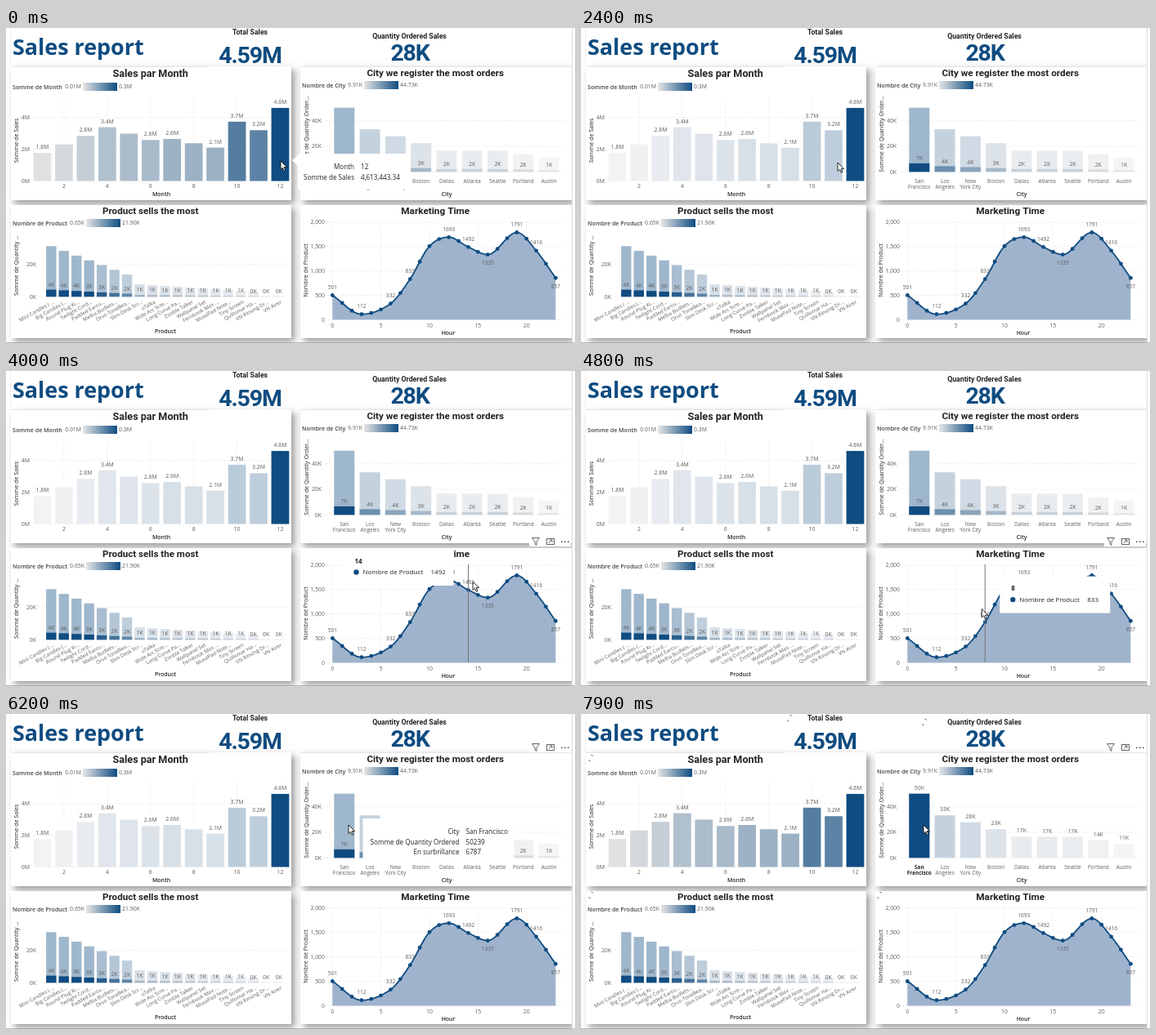
An HTML page with a canvas that plays this animation: 696 by 386 pixels, repeating every 8000 ms.

```html
<!DOCTYPE html>
<html lang="en">
<head>
<meta charset="utf-8">
<title>Sales report</title>
<style>
html, body { margin: 0; width: 100%; height: 100%; overflow: hidden; background: #fff; }
canvas { display: block; }
</style>
</head>
<body>
<canvas width="696" height="386"></canvas>
<script>
const ctx = document.querySelector('canvas').getContext('2d');
const LOOP = 8000;
const BLUE = '#0f4c81', INK = '#252423', GRAY = '#605e5c';
const PALE = [230, 230, 230], DEEP = [15, 76, 129];
const SANS = '"Open Sans", sans-serif', HEAD = 'Roboto, sans-serif';

const cities = ['San Francisco', 'Los Angeles', 'New York City', 'Boston', 'Dallas',
  'Atlanta', 'Seattle', 'Portland', 'Austin'];
const products = ['Mini Candles ( ...', 'Big Candles (...', 'Round Plug Ki...', 'Twilight Cord...',
  'Padded Earcu...', 'Melba Budlets...', 'Orvo ToneBea...', 'Slim Desk Scr...', 'uTalka',
  'Wide Arc Scre...', 'Long Curve Pa...', 'Zimble Talker', 'Wallpanel Set', 'Fernbook Max ...',
  'MusePad Note...', 'Tiny Screen', 'Quillomar Ha...', 'VN Rinsing Dr...', 'VN Airer'];

// Turning points only: straight lines join the bars and the pointer's stops, a smooth curve the hours.
const monthKeys = [[1, 1.76], [4, 3.39], [6, 2.58], [7, 2.65], [9, 2.1], [10, 3.74], [11, 3.2], [12, 4.61]];
const cityKeys = [[0, 50.24], [1, 33.29], [3, 22.5], [4, 16.7], [6, 16.5], [8, 11.15]];
const productKeys = [[0, 31], [6, 13.6], [7, 7.6], [16, 3.1], [17, .66], [18, .65]];
const hourKeys = [[0, 501], [3, 112], [6, 332], [8, 833], [10, 1510], [12, 1693], [14, 1492],
  [16, 1335], [19, 1791], [21, 1416], [23, 857]];
const pointerKeys = [[0, 336, 163], [600, 322, 164], [1000, 322, 164], [1700, 314, 165], [2600, 314, 165],
  [3200, 420, 285], [4000, 571, 258], [5000, 470, 300], [5400, 443, 143], [5900, 419, 136], [LOOP, 419, 136]];

const hourX = h => 399.3 + h * 11.87;
const hourY = v => 357.4 - v * .0597;

function segment(keys, x) {
  const i = Math.max(1, keys.findIndex(k => k[0] >= x));
  return [i, (x - keys[i - 1][0]) / (keys[i][0] - keys[i - 1][0])];
}

function along(keys, x, col = 1) {
  const [i, k] = segment(keys, x);
  return keys[i - 1][col] * (1 - k) + keys[i][col] * k;
}

// slope at a key, flat at peaks and valleys
function slope(keys, i) {
  const a = keys[i - 1] || keys[i], b = keys[i], c = keys[i + 1] || b;
  if ((b[1] - a[1]) * (c[1] - b[1]) < 0) return 0;
  return (c[1] - a[1]) / (c[0] - a[0]);
}

function smooth(keys, x) {
  const [i, k] = segment(keys, x), w = keys[i][0] - keys[i - 1][0], ease = k * k * (3 - 2 * k);
  return keys[i - 1][1] * (1 - ease) + keys[i][1] * ease +
    w * k * (1 - k) * (slope(keys, i - 1) * (1 - k) - slope(keys, i) * k);
}

function tone(p) {
  const q = Math.max(0, Math.min(1, p));
  return `rgb(${PALE.map((a, i) => Math.round(a + (DEEP[i] - a) * q))})`;
}

// y is the middle of the capitals
function text(s, x, y, { size = 6.9, color = GRAY, align = 'center', weight = 400, font = SANS, gap = 0 } = {}) {
  ctx.font = `${weight} ${size}px ${font}`;
  ctx.letterSpacing = gap + 'px';
  ctx.textAlign = align;
  ctx.fillStyle = color;
  ctx.fillText(s, x, y + size * .36);
}

function turned(s, x, y, angle, style) {
  ctx.save();
  ctx.translate(x, y);
  ctx.rotate(angle);
  text(s, 0, 0, style);
  ctx.restore();
}

function rect(x, y, w, h, color, alpha = 1) {
  ctx.globalAlpha = alpha;
  ctx.fillStyle = color;
  ctx.fillRect(x, y, w, h);
  ctx.globalAlpha = 1;
}

function line(x1, y1, x2, y2, color, dash = []) {
  ctx.beginPath();
  ctx.setLineDash(dash);
  ctx.strokeStyle = color;
  ctx.lineWidth = 1;
  ctx.moveTo(x1, y1);
  ctx.lineTo(x2, y2);
  ctx.stroke();
  ctx.setLineDash([]);
}

const grid = (x1, y1, x2, y2) => line(x1, y1, x2, y2, '#e4e4e4', [1, 2]);

function dot(x, y, r) {
  ctx.beginPath();
  ctx.arc(x, y, r, 0, 7);
  ctx.fillStyle = BLUE;
  ctx.fill();
}

function card(x, y, h, name, titleY, size) {
  const w = x < 100 ? 343 : 332;
  ctx.save();
  ctx.shadowColor = 'rgba(0,0,0,.4)';
  ctx.shadowBlur = 8;
  ctx.shadowOffsetX = ctx.shadowOffsetY = 4;
  rect(x, y, w, h, '#fff');
  ctx.restore();
  text(name, x + w / 2 - .8, titleY, { size, weight: 700, font: HEAD, color: INK });
}

function axisTitles(name, x, y, side, sx, sy) {
  text(name, x, y, { color: INK, weight: 600 });
  turned(side, sx, sy, -Math.PI / 2, { size: 7.15, color: INK });
}

function valueAxis(steps, step, base, gap, x, right) {
  for (let i = 0; i < steps; i++) {
    const y = base - i * gap;
    grid(x + 4, y, right, y);
    text(step(i), x, y, { align: 'right' });
  }
}

function legend(name, lo, hi, x, gx, y) {
  text(name, x, y, { size: 7.1, weight: 600, align: 'left', color: '#444' });
  text(lo, gx - 2, y, { align: 'right' });
  const g = ctx.createLinearGradient(gx, 0, gx + 42, 0);
  g.addColorStop(0, tone(0));
  g.addColorStop(1, tone(1));
  rect(gx, y - 5, 42, 10, g);
  text(hi, gx + 44, y, { align: 'left' });
}

function splitBar(x, w, base, h, part, color) {
  rect(x - w / 2, base - h, w, h, '#fff');
  rect(x - w / 2, base - h, w, h, color, .4);
  rect(x - w / 2, base - part, w, part, color);
}

function monthCard(dimmed) {
  card(6, 47, 164, 'Sales par Month', 55.5, 12.6);
  legend('Somme de Month', '0.01M', '0.3M', 8, 94, 72);
  valueAxis(3, i => i * 2 + 'M', 187.4, 38.75, 29, 347);
  for (let m = 1; m <= 12; m++) {
    const v = along(monthKeys, m), x = 18.05 + m * 26.45, h = v * 19.4;
    if (m % 2 == 0) {
      grid(x, 85, x, 187);
      text(m, x, 194);
    }
    splitBar(x, 21.6, 187.4, h, dimmed && m < 12 ? 0 : h, tone(m * v / 55));
    if (m % 3 != 2 || m > 9) text(v.toFixed(1) + 'M', x, 180 - h);
  }
  axisTitles('Month', 190, 204, 'Somme de Sales', 12, 138);
}

function cityCard(picked) {
  card(360, 47, 164, 'City we register the most orders', 55, 11.65);
  legend('Nombre de City', '9.91K', '44.73K', 362, 438, 70);
  valueAxis(3, i => i * 20 + 'K', 176.3, 31.3, 386, 682);
  cities.forEach((name, i) => {
    const v = along(cityKeys, i), x = 413.8 + i * 31.28;
    const chosen = picked && !i;
    const share = v * (picked ? +chosen : .133), top = picked ? v : share;
    splitBar(x, 25, 176.3, v * 1.565, share * 1.565, tone((v - 11.15) / 39));
    text(Math.round(top) + 'K', x, (picked ? 169 : 170) - top * 1.565);
    const [first, ...rest] = name.split(' ');
    const style = { size: 6.4, weight: chosen ? 700 : 400, color: chosen ? INK : GRAY };
    text(first, x, 187.5, style);
    text(rest.join(' '), x, 195, style);
  });
  axisTitles('City', 539, 203.5, 'Somme de Quantity Order…', 367, 130);
}

function productCard() {
  card(6, 217, 163, 'Product sells the most', 223.5, 11.6);
  legend('Nombre de Product', '0.65K', '21.90K', 8, 98, 239);
  valueAxis(2, i => i * 20 + 'K', 329.3, 40, 37, 342);
  products.forEach((name, i) => {
    const v = along(productKeys, i), x = 55.3 + i * 15.46, part = v * .14;
    splitBar(x, 12.4, 329.3, v * 2, part * 2, tone(v / 21.9));
    text(Math.round(part) + 'K', x, 323 - part * 2);
    turned(name, x + 3, 335, -Math.PI / 6.2, { size: 6.3, align: 'right' });
  });
  axisTitles('Product', 195, 372, 'Somme de Quantity …', 12, 291);
}

function timeCard() {
  card(360, 217, 163, 'Marketing Time', 224, 11.8);
  valueAxis(5, i => (i * 500).toLocaleString('en-US'), hourY(0), 29.85, 390, 682);
  for (let h = 0; h <= 20; h += 5) {
    grid(hourX(h), 238, hourX(h), 357);
    text(h, hourX(h), 365);
  }
  const curve = new Path2D();
  for (let h = 0; h <= 23; h += .25) curve.lineTo(hourX(h), hourY(smooth(hourKeys, h)));
  const area = new Path2D(curve);
  area.lineTo(hourX(23), hourY(0));
  area.lineTo(hourX(0), hourY(0));
  ctx.fillStyle = '#9fb3cd';
  ctx.fill(area);
  ctx.strokeStyle = BLUE;
  ctx.lineWidth = 1.8;
  ctx.stroke(curve);
  for (let h = 0; h <= 23; h++) dot(hourX(h), hourY(smooth(hourKeys, h)), 2.4);
  for (const [h, v] of hourKeys) {
    const below = h == 16 || h == 23;
    if (h != 10) text(v, hourX(h), hourY(v) + (below ? 10 : -10), { size: 6.6 });
  }
  axisTitles('Hour', 541, 374, 'Nombre de Product', 366.5, 297);
}

function header() {
  text('Sales report', 8, 23, { size: 26.9, weight: 700, align: 'left', color: BLUE });
  const small = { size: 8.75, weight: 700, font: HEAD, color: INK };
  const big = { size: 28.5, weight: 700, font: HEAD, color: BLUE, gap: -1.2 };
  text('Total Sales', 298.5, 4.7, small);
  text('4.59M', 298.5, 32.3, big);
  text('Quantity Ordered Sales', 493.5, 9.7, small);
  text('28K', 494, 29.3, big);
}

function spinner(x, y, t) {
  ctx.strokeStyle = '#555';
  ctx.lineWidth = 1;
  const a = t / 1000 * Math.PI * 2 - .82;
  for (const s of [a, a + Math.PI]) {
    ctx.beginPath();
    ctx.arc(x, y, 3.8, s, s + .7);
    ctx.stroke();
  }
}

function tools(y) {
  rect(640, y - 6, 51, 12, '#fff');
  ctx.strokeStyle = '#666';
  ctx.lineWidth = 1;
  ctx.stroke(new Path2D(`M643.5 ${y - 4.5}h9l-3.5 4.5v4.5l-2-1.5v-3z`));
  ctx.strokeRect(661.5, y - 3.5, 9, 7);
  ctx.stroke(new Path2D(`M664 ${y + 1.5}l4-3.5m-3 0h3v3`));
  for (let i = 0; i < 3; i++) rect(679 + i * 4, y - .5, 1.6, 1.6, '#555');
}

function rows(list, x, y) {
  list.forEach(([name, value], i) => {
    const style = { size: 8.1, color: INK };
    text(name, x, y + i * 12.4, { ...style, align: 'right' });
    text(value, x + 8, y + i * 12.4, { ...style, align: 'left' });
  });
}

function monthTip(alpha) {
  ctx.save();
  ctx.globalAlpha = alpha;
  ctx.fillStyle = '#fff';
  ctx.fill(new Path2D('M357 154H495V198H357V169L350 162L357 156z'));
  rows([['Month', '12'], ['Somme de Sales', '4,613,443.34']], 426, 170.5);
  ctx.restore();
}

function cityTip(x, y, name, total, part) {
  rect(x, y, 185, 56, '#fff');
  rows([['City', name], ['Somme de Quantity Ordered', total], ['En surbrillance', part]], x + 118, y + 16.5);
}

function hourTip(px, py) {
  const h = Math.max(0, Math.min(23, Math.round((px - hourX(0)) / 11.87)));
  const x = hourX(h), left = x - 153 > 362 ? x - 153 : x + 18, top = py - 40;
  const style = { size: 8, align: 'left', color: INK };
  line(x, 237, x, 357, '#777');
  rect(left, top, 135, 45, '#fff');
  text(h, left + 14, top + 15, { ...style, weight: 700 });
  dot(left + 16, top + 28.5, 3.2);
  text('Nombre de Product', left + 24, top + 28.5, style);
  text(Math.round(smooth(hourKeys, h)), left + 107, top + 28.5, style);
}

function pointer(x, y) {
  const p = new Path2D('M0 0V10.5L2.5 8.2L4.3 12.2L6 11.4L4.2 7.6H7.5z');
  ctx.save();
  ctx.translate(x, y);
  ctx.fillStyle = '#fff';
  ctx.strokeStyle = '#111';
  ctx.lineWidth = .9;
  ctx.fill(p);
  ctx.stroke(p);
  ctx.restore();
}

function draw(t) {
  const px = along(pointerKeys, t), py = along(pointerKeys, t, 2);
  const picked = t >= 7000;
  rect(0, 0, 696, 386, '#fff');
  monthCard(t >= 100 && !picked);
  cityCard(picked);
  productCard();
  timeCard();
  header();

  // page edges, which cut off the shadows
  rect(692, 0, 4, 386, '#fff');
  line(692.5, 0, 692.5, 385, '#ddd');
  line(0, 385.5, 696, 385.5, '#777', [1, 1]);
  line(5.5, 0, 5.5, 47, '#eee');
  line(6, 47.5, 248, 47.5, '#e6e6e6');
  line(360, 47.5, 691, 47.5, '#e6e6e6');

  if (t >= 3200 && t < 5100) {
    tools(209);
    hourTip(px, py);
  }
  if (t >= 5100) tools(41);
  if (t < 2400) monthTip(Math.min(1, (2400 - t) / 350));
  if (t >= 5300 && t < 5800) cityTip(464, 141.5, 'Los Angeles', '33289', '4378');
  if (t >= 5800 && t < 6900) cityTip(436.5, 128, 'San Francisco', '50239', '6787');

  if (t >= 100 && t < 1700 || t >= 7000) {
    const spots = [[255, 5], [420, 10], picked ? [12, 54] : [365, 53], [12, 222], [365, 222]];
    spots.forEach(([x, y]) => spinner(x, y, t));
  }
  pointer(px, py);
}

const start = performance.now();
function tick(now) {
  const t = Math.max(0, now - start) % LOOP;
  draw(Math.floor(t / 100) * 100);
  requestAnimationFrame(tick);
}
tick(start);
</script>
</body>
</html>
```
